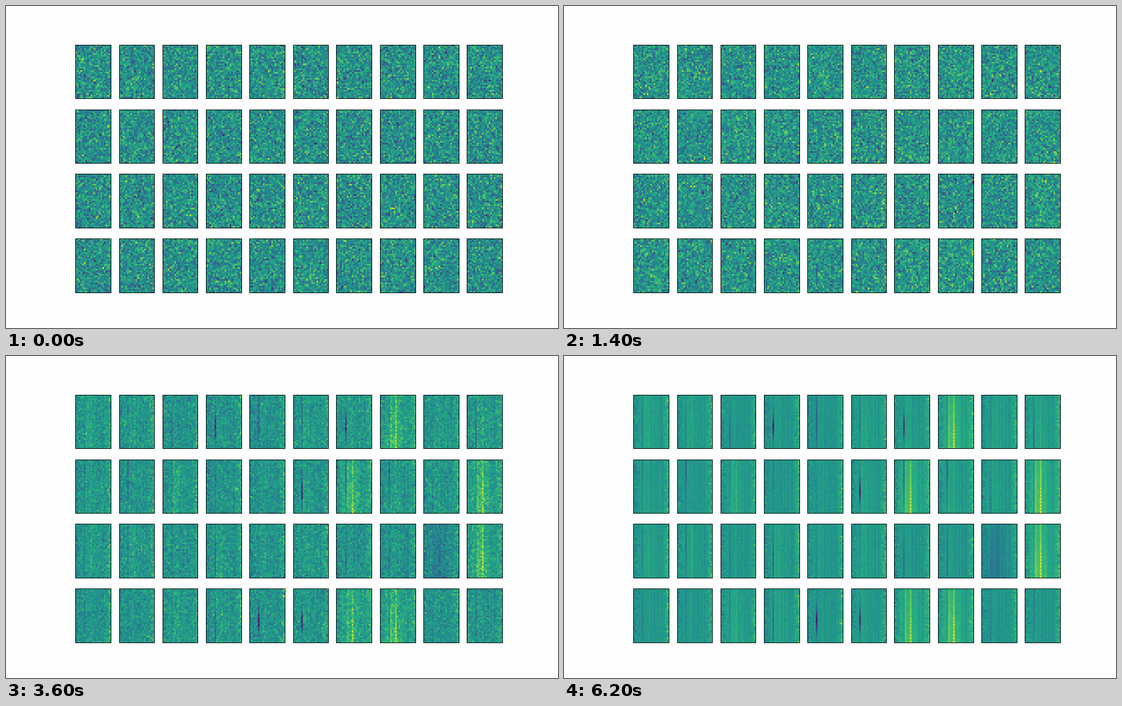
An HTML page with a canvas that plays this animation: 980 by 572 pixels, repeating every 6.4 s.

```html
<!DOCTYPE html>
<html lang="en">
<head>
<meta charset="utf-8">
<title>Noise to signal</title>
<style>
html, body { margin: 0; width: 100%; height: 100%; overflow: hidden; background: #fefefe; }
canvas { display: block; }
</style>
</head>
<body>
<canvas id="stage" width="980" height="572"></canvas>
<script>
const ctx = document.getElementById('stage').getContext('2d');
const COLS = 21, ROWS = 32, CELLS = COLS * ROWS;
const ACROSS = 10, PANELS = 40;
const STEPS = 32, STEP_MS = 200;

// Panels with a standout feature; all others get faint random ones
const STREAKED = [3, 6, 15, 34, 35];
const BANDED = [7, 16, 19, 29, 36, 37];
const COOL = 28;

const RAMP = ['440154', '472d7b', '3b528b', '2c728e', '21918c', '28ae80', '5ec962', 'addc30', 'fde725']
  .map(hex => [0, 2, 4].map(i => parseInt(hex.slice(i, i + 2), 16)));
const PALETTE = Array.from({ length: 128 }, (_, i) => {
  const p = i / 127 * (RAMP.length - 1), k = Math.min(RAMP.length - 2, Math.floor(p));
  return `rgb(${RAMP[k].map((v, j) => Math.round(v + (RAMP[k + 1][j] - v) * (p - k)))})`;
});

let seed = 20231;
function rand() {
  seed = (seed + 0x6D2B79F5) | 0;
  let t = Math.imul(seed ^ (seed >>> 15), 1 | seed);
  t = (t + Math.imul(t ^ (t >>> 7), 61 | t)) ^ t;
  return ((t ^ (t >>> 14)) >>> 0) / 4294967296;
}
const gauss = () => Math.sqrt(-2 * Math.log(1 - rand())) * Math.cos(2 * Math.PI * rand());
const bell = (x, mid, width) => Math.exp(-(((x - mid) / width) ** 2));
const clamp = v => Math.max(0, Math.min(1, v));

function bandStrength(panel) {
  if (panel === COOL) return -.12;
  return BANDED.includes(panel) ? .1 + .015 * (panel % ACROSS) : .08 * rand() ** 2;
}

// The clean picture of one panel: vertical bands, one dark streak, grainy sides
function signal(panel) {
  const streaked = STREAKED.includes(panel), banded = BANDED.includes(panel);
  const depth = streaked ? .4 : .04 + .16 * rand() ** 2;
  const centre = streaked ? .6 : rand();
  const spread = streaked ? .23 : .5;
  const band = bandStrength(panel);
  const tint = Array.from({ length: COLS }, () => gauss() * .009);
  return Float32Array.from({ length: CELLS }, (_, n) => {
    const c = n % COLS, r = Math.floor(n / COLS), y = r / (ROWS - 1);
    const left = clamp((4 - c) / 4), right = clamp((c - 17) / 3);
    const profile = bell(c, 8.2, 4) * (c % 3 ? .5 : 1.1) + .2;
    let v = tint[c] + gauss() * (.014 + .05 * left + .05 * right);
    v += .07 * right - .05 * left + band * profile * (.75 + .4 * y);
    if (c > 9 && c < 18 && c % 2 === 0) v -= .035;
    if (c === 5) v -= .03 + depth * bell(y, centre, spread);
    if (banded && c === 9 && y > .5) v += r % 2 ? .1 : -.03;
    return v;
  });
}

function buildSteps() {
  const clean = Array.from({ length: PANELS }, (_, p) => signal(p));
  const noise = Float32Array.from({ length: PANELS * CELLS }, gauss);
  return Array.from({ length: STEPS }, (_, i) => {
    const t = i / (STEPS - 1);
    const p = Math.min(1, Math.pow(t * 1.15, 1.2));
    const angle = p * p * (3 - 2 * p) * Math.PI / 2;
    const keep = Math.sin(angle);
    const sigma = .118 * (Math.cos(angle) + .03 * (1 - t));
    const mean = .505 + .03 * t;
    return Uint8Array.from(noise, (_, n) => {
      if (i) noise[n] = .8 * noise[n] + .6 * gauss();
      const v = mean + keep * clean[Math.floor(n / CELLS)][n % CELLS] + sigma * noise[n];
      return Math.round(127 * clamp(v));
    });
  });
}

// The plot is laid out on a 1200 x 700 figure, with lines snapped to its pixels
const SX = 980 / 1200, SY = 572 / 700;
const PITCH_X = 930 / 11.8, PITCH_Y = 539 / 4.6;
const PANEL_W = PITCH_Y * COLS / ROWS;
const snap = (v, scale) => Math.floor((Math.round(v) + .5) * scale);

function drawPanel(shade, panel) {
  const x = 150 + PITCH_X * 1.2 * (panel % ACROSS) + (PITCH_X - PANEL_W) / 2;
  const y = 84 + PITCH_Y * 1.2 * Math.floor(panel / ACROSS);
  const left = snap(x, SX), right = snap(x + PANEL_W, SX);
  const top = snap(y, SY), bottom = snap(y + PITCH_Y, SY);
  const edgeX = c => Math.max(left, Math.min(right, Math.round((x + PANEL_W * c / COLS) * SX)));
  const edgeY = r => Math.max(top, Math.min(bottom, Math.round((y + PITCH_Y * r / ROWS) * SY)));
  for (let n = 0; n < CELLS; n++) {
    const c = n % COLS, r = Math.floor(n / COLS);
    const x0 = edgeX(c), y0 = edgeY(r);
    const x1 = c === COLS - 1 ? right : edgeX(c + 1);
    const y1 = r === ROWS - 1 ? bottom : edgeY(r + 1);
    ctx.fillStyle = PALETTE[shade[panel * CELLS + n]];
    ctx.fillRect(x0, y0, x1 - x0, y1 - y0);
  }
  ctx.strokeRect(left + .5, top + .5, right - left, bottom - top);
}

function draw(step) {
  ctx.fillStyle = '#fefefe';
  ctx.fillRect(0, 0, 980, 572);
  ctx.strokeStyle = '#000';
  ctx.lineWidth = 1;
  for (let p = 0; p < PANELS; p++) drawPanel(steps[step], p);
}

const steps = buildSteps();
const start = performance.now();
let shown = 0;
draw(0);

function tick() {
  const step = Math.floor((performance.now() - start) / STEP_MS) % STEPS;
  if (step !== shown) draw(shown = step);
  requestAnimationFrame(tick);
}
requestAnimationFrame(tick);
</script>
</body>
</html>
```
